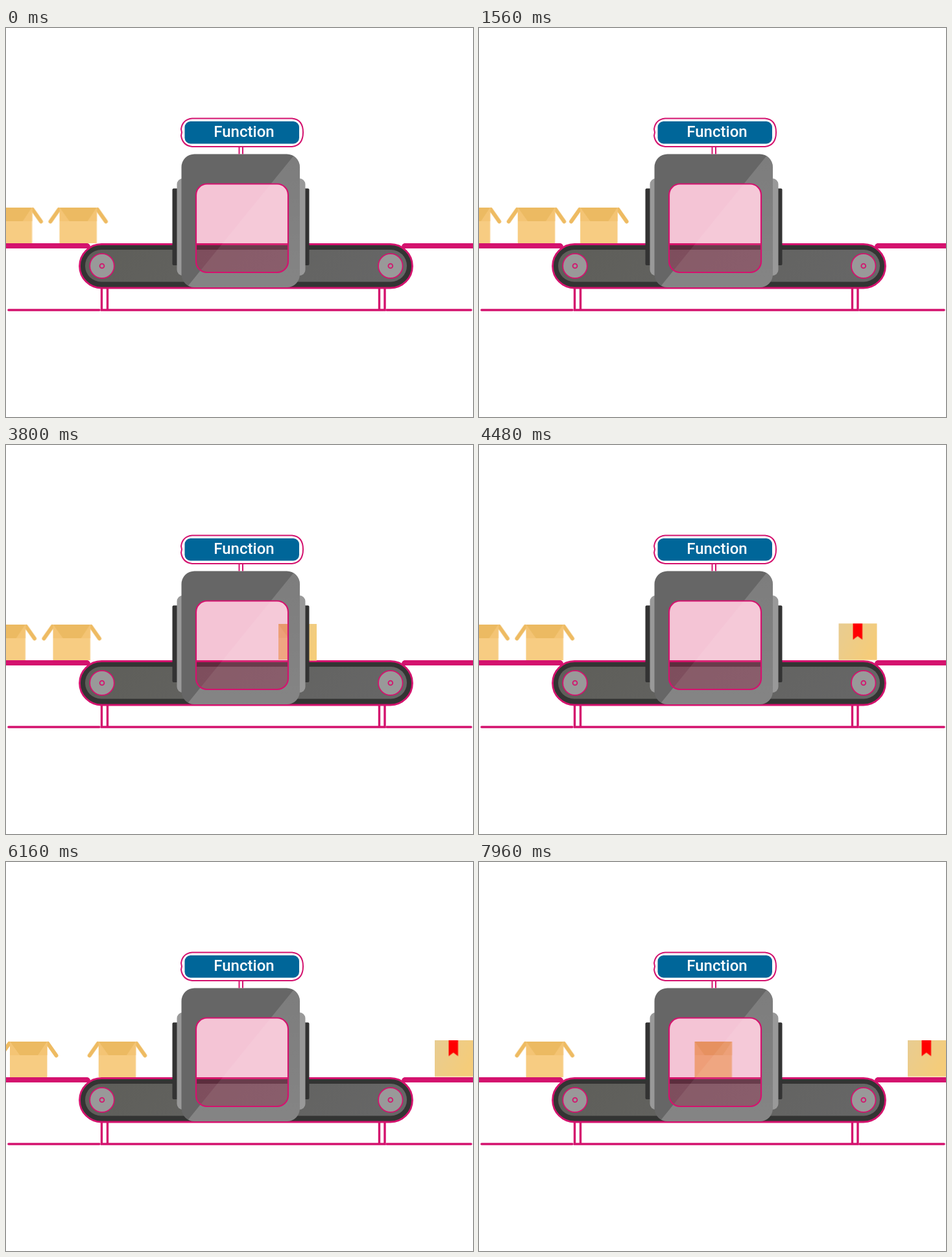
An HTML page for the animation above (8000 ms loop, 720 by 600 pixels).

```html
<!DOCTYPE html>
<html lang="en">
<head>
<meta charset="utf-8">
<title>Function machine</title>
<style>
html, body { margin: 0; width: 100%; height: 100%; overflow: hidden; background: #fff; }
svg { display: block; width: 720px; height: 600px; }
.first, .second, .third { animation: 8s linear infinite; }
.first { animation-name: first; }
.second { animation-name: second; }
.third { animation-name: third; }

/* Box travel: queue, machine, exit */
@keyframes first {
  0%, 9.5% { transform: translate(82.5px, 277px); }
  19.5% { transform: translate(156px, 277px); }
  21% { transform: translate(169px, 277px); }
  30.5%, 42% { transform: translate(332.5px, 277px); }
  62.7%, 100% { transform: translate(660.5px, 274.5px); }
}
@keyframes second {
  0%, 10.5% { transform: translate(-17.5px, 277px); }
  21%, 73.5% { transform: translate(72.5px, 277px); }
  86.5%, 100% { transform: translate(332.5px, 277px); }
}
@keyframes third {
  0%, 10.5% { transform: translate(-117.5px, 277px); }
  21%, 73.5% { transform: translate(-27.5px, 277px); }
  84%, 100% { transform: translate(72.5px, 277px); }
}

/* Side flaps fold away behind the box */
.fold { transform-origin: 28.75px 0; animation: 8s linear infinite; }
.first .fold { animation-name: foldFirst; }
.second .fold { animation-name: foldSecond; }
@keyframes foldFirst { 0%, 30.5% { transform: none; } 33.5%, 100% { transform: scaleX(.6); } }
@keyframes foldSecond { 0%, 86.5% { transform: none; } 89.5%, 100% { transform: scaleX(.6); } }

/* Progress lights */
.light { stroke: #d0105f; stroke-width: 3; visibility: hidden; animation: 8s step-end infinite; }
.l1 { animation-name: l1; }
.l2 { animation-name: l2; }
.l3 { animation-name: l3; }
@keyframes l1 { 0%, 41.9%, 99.4% { visibility: hidden; } 27%, 84.4% { visibility: visible; } }
@keyframes l2 { 0%, 41.9%, 99.4% { visibility: hidden; } 31.9%, 89.4% { visibility: visible; } }
@keyframes l3 { 0%, 41.9%, 99.4% { visibility: hidden; } 36.9%, 94.4% { visibility: visible; } }

.line { fill: none; stroke: #d4126e; }
.sign { font: 500 24px Roboto, Arial, sans-serif; fill: #fff; text-anchor: middle; }
</style>
</head>
<body>
<svg viewBox="0 0 720 600">
  <defs>
    <linearGradient id="card" x1="0" x2="1" y2=".5">
      <stop stop-color="#e8cc92"/><stop offset="1" stop-color="#f5cc7a"/>
    </linearGradient>
    <linearGradient id="sheen" x1="0" x2="0" y2="1">
      <stop stop-color="#fff" stop-opacity=".15"/><stop offset="1" stop-color="#fff" stop-opacity=".2"/>
    </linearGradient>
    <linearGradient id="inner" x2="1" y2=".1">
      <stop stop-color="#5e5e59"/><stop offset="1" stop-color="#666"/>
    </linearGradient>
    <clipPath id="before"><path d="M0 0H453V600H0Z"/></clipPath>
    <clipPath id="after"><path d="M453 0H720V600H453Z"/></clipPath>
    <path id="shell" fill-rule="evenodd" clip-rule="evenodd" d="M290.500 194.500H433A20 20 0 0 1 453 214.500V380A20 20 0 0 1 433 400H290.500A20 20 0 0 1 270.500 380V214.500A20 20 0 0 1 290.500 194.500Z
      M310 240.500A17 17 0 0 0 293 257.500V360A17 17 0 0 0 310 377H418A17 17 0 0 0 435 360V257.500A17 17 0 0 0 418 240.500Z"/>
    <rect id="pane" x="293" y="240.500" width="142" height="136.500" rx="17"/>
    <path id="glare" d="M446 194H454V401H278Z"/>
    <clipPath id="onShell"><use href="#shell"/></clipPath>
    <clipPath id="onPane"><use href="#pane"/></clipPath>

    <g id="flaps" fill="none" stroke="#eebb62" stroke-width="6" stroke-linecap="round">
      <path d="M-1 3L-14 21.500M58.500 3L71.500 21.500"/>
    </g>
    <g id="carton">
      <path d="M0 0H57.500V55H0Z" fill="#f7cc82"/>
      <path d="M0 0H57.500L43.500 21H15Z" fill="#ecba62"/>
      <path d="M0 0V21H10L15 21ZM57.500 0V21H43.500Z" fill="#f4c474"/>
    </g>
    <g id="parcel">
      <rect width="59" height="56.500" fill="url(#card)"/>
      <path d="M22 0H36.500V25L29.250 19.500L22 25Z" fill="#f00"/>
    </g>
    <g id="wheel">
      <circle r="18.800" fill="#999" stroke="#d4126e" stroke-width="1.800"/>
      <circle class="line" r="3.400" stroke-width="1.800"/>
    </g>
  </defs>

  <!-- Ground, legs and shelves -->
  <g class="line" stroke-linecap="round">
    <path d="M4 435H144M587 435H717" stroke-width="3.600"/>
    <path d="M147.500 401V435H584V401M156.500 401V435M575.500 401V435" stroke-width="3.400"/>
  </g>
  <path d="M0 332H125Q128 332 130 336L128 340H0ZM720 332H614Q611 333 610 336L612 340H720Z" fill="#d4126e"/>

  <!-- Belt -->
  <rect x="113.500" y="333.500" width="513" height="67.500" rx="33.750" fill="#333433" stroke="#d4126e" stroke-width="2.800"/>
  <rect x="122" y="342" width="496" height="49.500" rx="24.750" fill="url(#inner)"/>
  <use href="#wheel" x="148" y="367"/>
  <use href="#wheel" x="592.800" y="367"/>

  <!-- Boxes -->
  <g class="third"><use href="#flaps"/><use href="#carton"/></g>
  <g class="second"><g class="fold"><use href="#flaps"/></g><use href="#carton"/></g>
  <g clip-path="url(#before)">
    <g class="first"><g class="fold"><use href="#flaps"/></g><use href="#carton"/></g>
  </g>
  <g clip-path="url(#after)">
    <g class="first"><use href="#parcel"/></g>
  </g>

  <!-- Machine -->
  <g fill="#333">
    <rect x="256.500" y="247.500" width="20" height="118.500" rx="2"/>
    <rect x="447.500" y="247.500" width="20" height="118.500" rx="2"/>
  </g>
  <g fill="#999">
    <rect x="263.500" y="232" width="24" height="150" rx="9"/>
    <rect x="437.500" y="232" width="24" height="150" rx="9"/>
  </g>
  <use href="#pane" fill="#d41e5f" fill-opacity=".26"/>
  <use href="#glare" fill="#fff" fill-opacity=".07" clip-path="url(#onPane)"/>
  <use href="#shell" fill="#666"/>
  <use href="#glare" fill="url(#sheen)" clip-path="url(#onShell)"/>
  <use href="#pane" class="line" stroke-width="2.200"/>
  <path class="light l1" d="M289 210H307"/>
  <path class="light l2" d="M309 210H327"/>
  <path class="light l3" d="M329 210H347"/>

  <!-- Sign -->
  <path class="line" d="M359.500 183V194.500M365 183V194.500" stroke-width="2"/>
  <path class="line" stroke-width="2" d="M287 139.500H441Q458 141 458 161Q458 181 441 183H287Q272 181 270 166L271 161L270 156Q272 141 287 139.500Z"/>
  <rect x="275.500" y="144" width="176.500" height="34.500" rx="9" fill="#069"/>
  <text class="sign" x="367" y="168">Function</text>
</svg>
</body>
</html>
```
